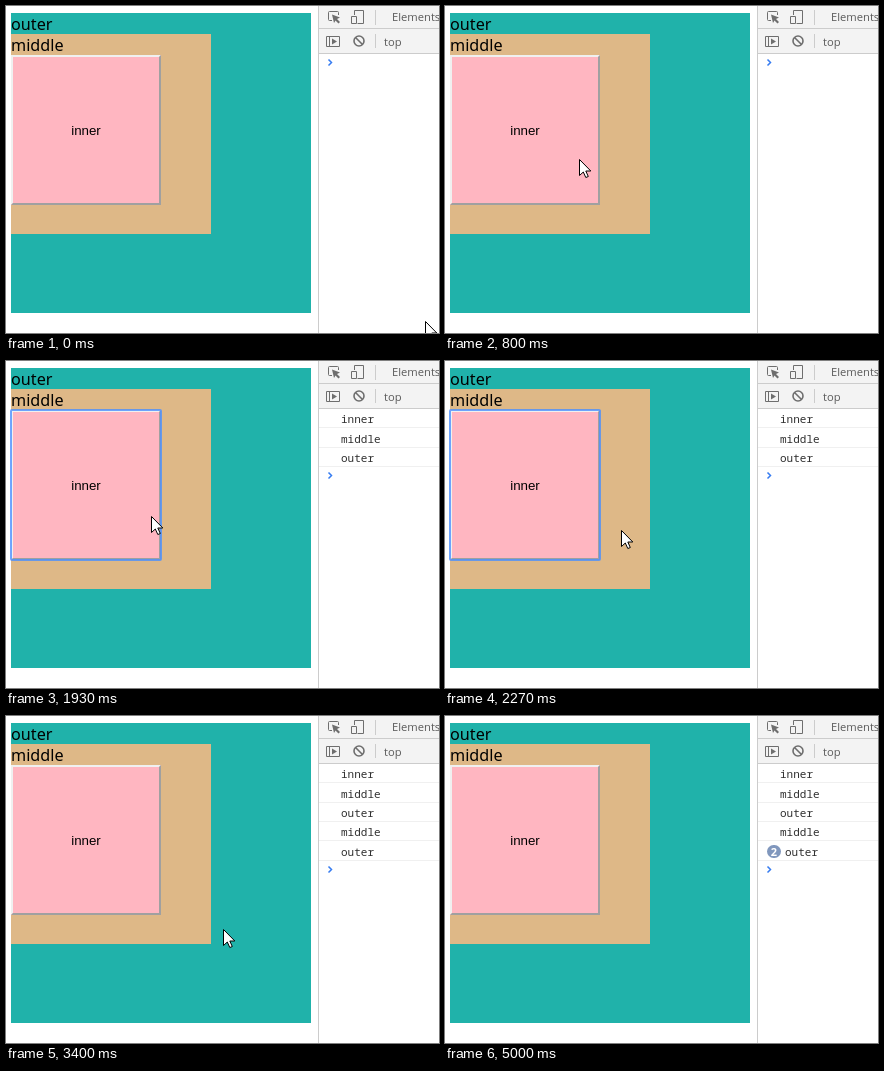
These frames come from a looping animation (433 px wide and 327 px high, 5590 ms). An HTML page:

```html
<!DOCTYPE html>
<html lang="en">
<head>
<meta charset="utf-8">
<title>Event bubbling</title>
<style>
  html, body { margin: 0; width: 100%; height: 100%; overflow: hidden; background: #fff; }
  svg { display: block; }
  .label { font: 16.2px "Noto Sans", sans-serif; }
  .button { font: 13.333px "Liberation Sans", Arial, sans-serif; text-anchor: middle; }
  .ui { font: 11.2px "Open Sans", sans-serif; fill: #5a5a5a; }
  .log { font: 11px "Noto Sans Mono", monospace; fill: #303030; }
  .count { font: bold 11px "Open Sans", sans-serif; fill: #fff; text-anchor: middle; }
  .icon { fill: none; stroke: #6e6e6e; }
</style>
</head>
<body>
<svg width="433" height="327" viewBox="0 0 433 327">
  <path fill="#20b2aa" d="M5 7h300v300H5z"/>
  <path fill="#deb887" d="M5 28h200v200H5z"/>
  <path fill="#ffb6c1" d="M5 49h150v150H5z"/>
  <path fill="#f0f0f0" d="M5 49h150l-2 2H7v146l-2 2z"/>
  <path fill="#a0a0a0" d="M155 49v150H5l2-2h146V51z"/>
  <rect id="ring" x="5" y="49" width="150" height="150" rx="1" fill="none"
        stroke="#4d90fe" stroke-opacity=".8" stroke-width="2"/>
  <text class="label" x="5" y="24">outer</text>
  <text class="label" x="5" y="45">middle</text>
  <text class="button" x="80" y="129">inner</text>

  <path fill="#f3f3f3" d="M313 0h120v47H313z"/>
  <path fill="none" stroke="#ccc" d="M312.5 0v327M313 22.5h120M313 47.5h120M369.5 4v15M369.5 28v14"/>
  <g class="icon">
    <path d="M326 14.5h-2.5q-1 0-1-1v-7q0-1 1-1h8q1 0 1 1V9"/>
    <path fill="#6e6e6e" stroke="none" d="M326 8.500l8 3-3 1.500 3 3-1.500 1.500-3-3-1.500 2.500z"/>
    <path d="M348.500 9V4.500h9v13h-6M345.500 10.500h5v7h-5z"/>
    <path d="M320.500 30.500h13v10h-13zM323.500 30.500v10"/>
    <path fill="#6e6e6e" stroke="none" d="M326 32.500l5 3-5 3z"/>
    <g stroke-width="1.600"><circle cx="353" cy="35" r="5"/><path d="M349.500 31.500l7 7"/></g>
  </g>
  <text class="ui" x="386" y="15">Elements</text>
  <text class="ui" x="378" y="40">top</text>

  <g id="rows"></g>
  <g id="badge">
    <rect x="322" y="129" width="14" height="13" rx="6.500" fill="#8097bd"/>
    <text class="count" x="329" y="139.500">2</text>
  </g>
  <path id="prompt" fill="none" stroke="#367cf1" stroke-width="1.500" d="M322.500 -3l3 3-3 3"/>
  <path id="cursor" fill="#fff" stroke="#000" stroke-linejoin="round"
        d="M.5.500v16l3.800-3.500 2.500 5.500 2.500-1-2.500-5.500h5z"/>
</svg>
<script>
const LOOP = 5590, TICK = 1000 / 15;
const $ = id => document.getElementById(id);

// Pointer path: [tick, x, y], straight between points
const path = [
  [0, 419, 315], [2, 273, 203], [5, 273, 203], [8, 195, 172], [12, 134, 153],
  [28, 134, 153], [29, 145, 155], [34, 176, 169], [48, 176, 169],
  [51, 217, 213], [55, 242, 249], [67, 242, 249], [74, 85, 318], [75, 70, 340]
];

const rowEnd = k => 47 + Math.round(19.3 * k);

$('rows').innerHTML = ['inner', 'middle', 'outer', 'middle', 'outer'].map((word, i) => {
  const y = rowEnd(i + 1);
  return `<g><text class="log" x="335" y="${y - 4}">${word}</text>
    <path stroke="#f0f0f0" d="M313 ${y + .5}h120"/></g>`;
}).join('');
const rows = [...$('rows').children];
const lastWord = rows[4].querySelector('text');

function pointer(tick) {
  const next = path.findIndex(p => p[0] > tick);
  if (next < 0) return path[path.length - 1].slice(1);
  const [t0, x0, y0] = path[next - 1], [t1, x1, y1] = path[next];
  const f = (tick - t0) / (t1 - t0);
  return [Math.round(x0 + (x1 - x0) * f), Math.round(y0 + (y1 - y0) * f)];
}

const show = (el, on) => el.setAttribute('visibility', on ? 'visible' : 'hidden');
const move = (el, x, y) => el.setAttribute('transform', `translate(${x} ${y})`);

function draw(now) {
  const tick = Math.floor((now % LOOP + 5) / TICK);
  const count = tick < 21 ? 0 : tick < 46 ? 3 : 5;
  const repeated = tick >= 65;
  show($('ring'), tick >= 20 && tick < 45);
  rows.forEach((row, i) => show(row, i < count));
  show($('badge'), repeated);
  lastWord.setAttribute('x', repeated ? 340 : 335);
  move($('prompt'), 0, rowEnd(count) + 9.5);
  move($('cursor'), ...pointer(tick));
}

const start = performance.now();
function frame() {
  draw(performance.now() - start);
  requestAnimationFrame(frame);
}
frame();
</script>
</body>
</html>
```
